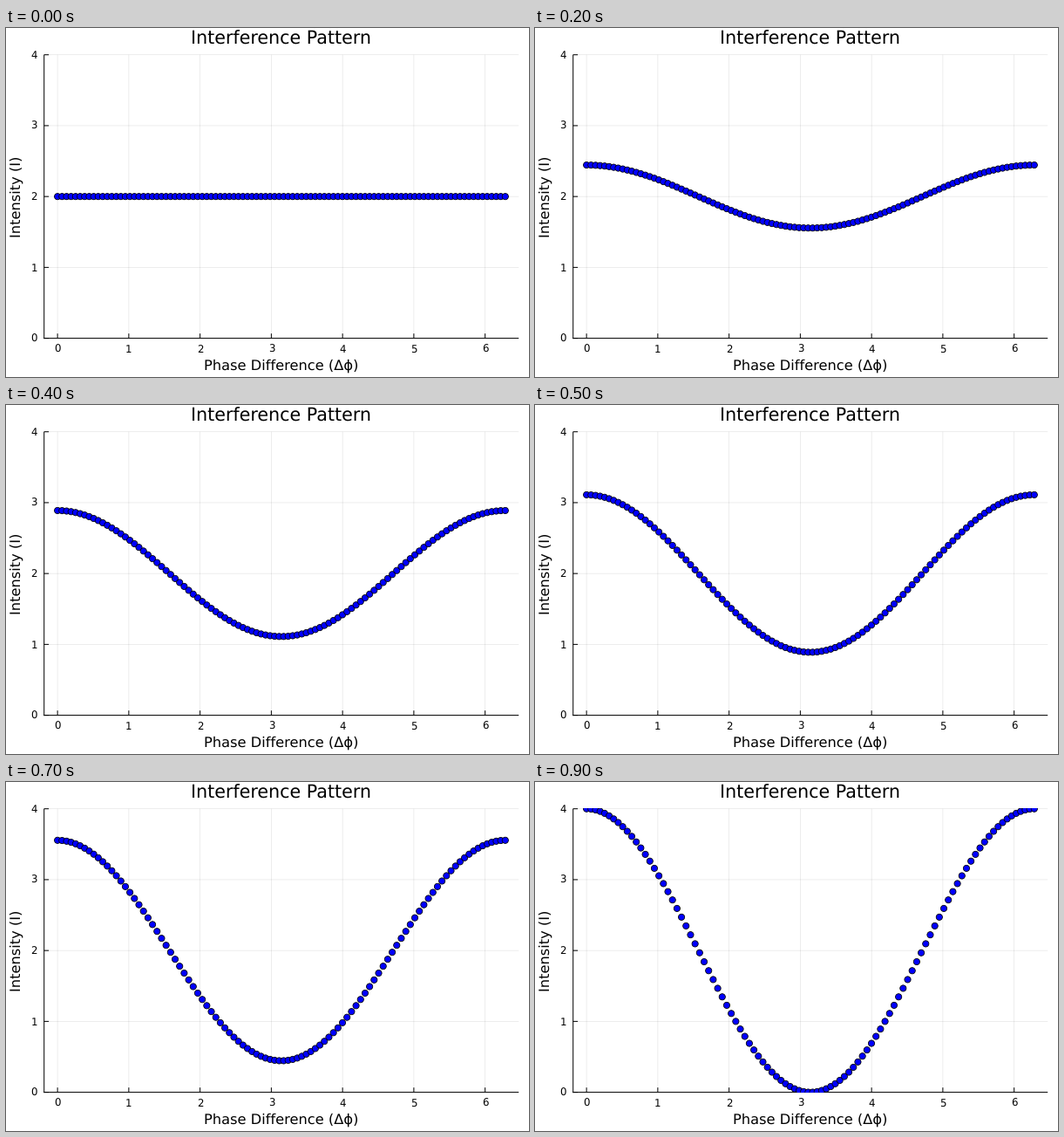
Recreate the animation shown at these times as a matplotlib script. Size 600x400 px, loop 1000 ms.

```python
import matplotlib.pyplot as plt
import numpy as np
from matplotlib.animation import FuncAnimation
from matplotlib.patches import Rectangle

WIDTH, HEIGHT, DPI = 600, 400, 100
FRAMES, INTERVAL = 10, 100
LEFT, RIGHT, TOP, BOTTOM = 43.7, 588.2, 30.7, 355.6
PT = 72 / DPI  # points per pixel
TAU = 2 * np.pi
X_PAD = 0.03 * TAU

plt.rcParams.update({
    "font.family": "DejaVu Sans",
    "text.hinting": "none",
    "path.simplify": False,
})


def x_px(phase):
    return LEFT + (phase + X_PAD) / (TAU + 2 * X_PAD) * (RIGHT - LEFT)


def y_px(intensity):
    return BOTTOM - intensity / 4 * (BOTTOM - TOP)


fig = plt.figure(figsize=(WIDTH / DPI, HEIGHT / DPI), dpi=DPI, facecolor="white")
ax = fig.add_axes([0, 0, 1, 1])
ax.set_xlim(0, WIDTH)
ax.set_ylim(HEIGHT, 0)
ax.axis("off")


def line(x0, y0, x1, y1, width=1.0, alpha=1.0):
    ax.plot([x0, x1], [y0, y1], color="black", lw=width * PT, alpha=alpha,
            solid_capstyle="butt", snap=False, clip_on=False, zorder=1)


def label(x, y, text, size, rotation=0):
    ax.text(x, y, text, fontsize=size * PT, rotation=rotation,
            rotation_mode="anchor", ha="center", va="baseline")


def draw_axes():
    tick, grid = 5.4, dict(width=0.7, alpha=0.1)
    for value in range(7):
        x = x_px(value)
        line(x, TOP, x, BOTTOM, **grid)
        line(x, BOTTOM, x, BOTTOM - tick)
        label(x, 371.5, str(value), 11.8)
    for value in range(5):
        y = y_px(value)
        line(LEFT, y, RIGHT, y, **grid)
        line(LEFT, y, LEFT + tick, y)
        label(32, y + 4.3, str(value), 11.8)
    line(LEFT - 0.5, BOTTOM, RIGHT, BOTTOM)
    line(LEFT, TOP, LEFT, BOTTOM + 0.5)

    center_x, center_y = (LEFT + RIGHT) / 2, (TOP + BOTTOM) / 2
    label(center_x, 18.5, "Interference Pattern", 20.7)
    label(center_x, 392, "Phase Difference (Δϕ)", 16.25)
    label(16.5, center_y, "Intensity (I)", 16.25, rotation=90)


draw_axes()

phase = np.linspace(0, TAU, 100)
dot_sizes = np.full(phase.size, (7.2 * PT) ** 2)
dots = ax.scatter(x_px(phase), y_px(2 + 0 * phase), s=dot_sizes,
                  facecolor="blue", edgecolor="black", linewidth=0.8 * PT, zorder=3)
dots.set_clip_path(Rectangle((43, 30), 546, 326, transform=ax.transData))


def update(frame):
    visibility = frame / (FRAMES - 1)
    intensity = 2 * (1 + visibility * np.cos(phase))
    dots.set_offsets(np.column_stack([x_px(phase), y_px(intensity)]))
    return dots,


animation = FuncAnimation(fig, update, frames=FRAMES, interval=INTERVAL,
                          repeat=True, repeat_delay=0, blit=False)
plt.show()
```
